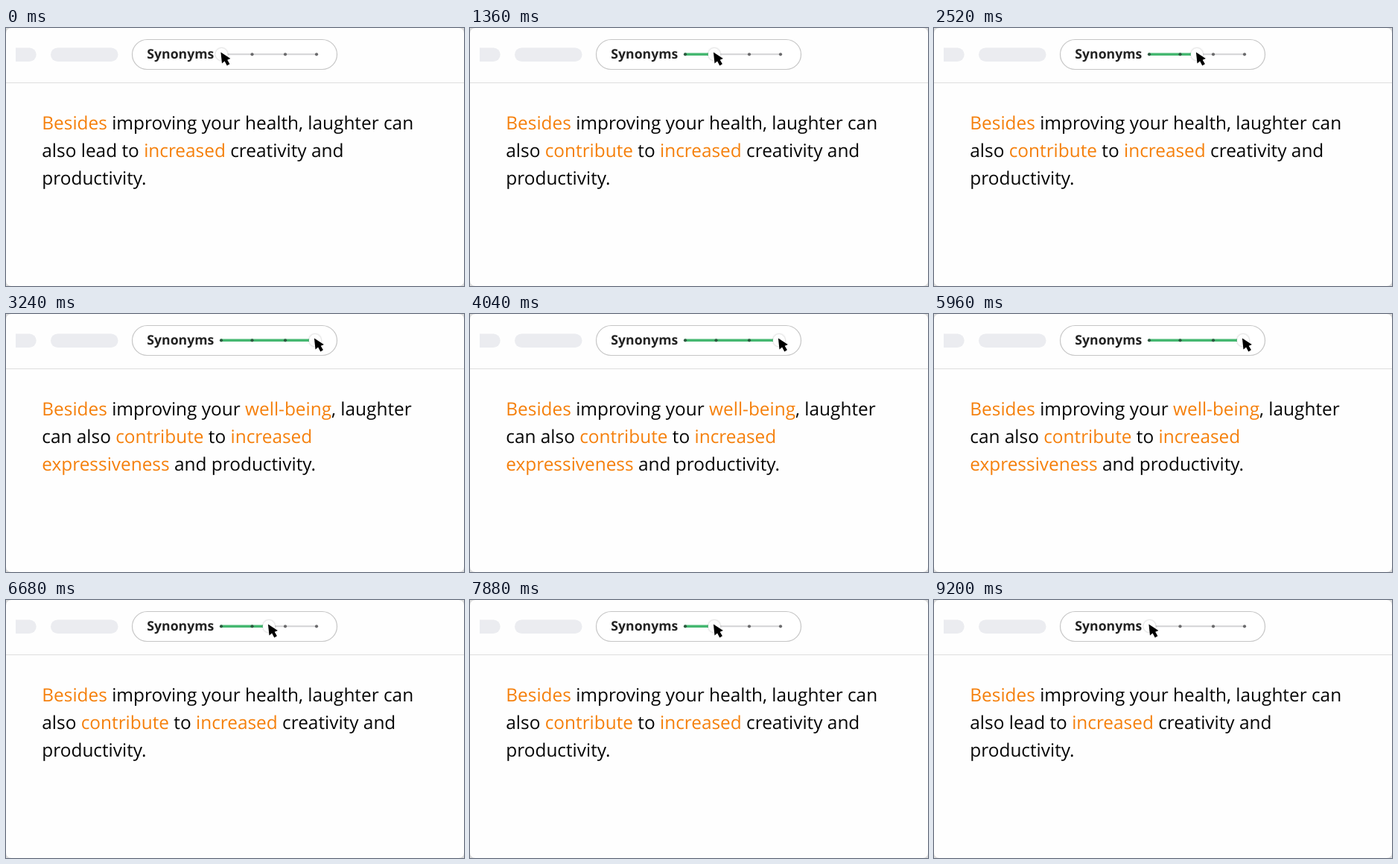
An HTML page for the animation above (9.24 s loop, 615 by 346 pixels).

```html
<!DOCTYPE html>
<html lang="en">
<head>
<meta charset="utf-8">
<title>Synonym slider</title>
<style>
  html, body { margin: 0; width: 100%; height: 100%; overflow: hidden; background: #dcdcdc; }
  svg { display: block; width: 100vw; height: 100vh; }
  text { font-family: "Open Sans", sans-serif; white-space: pre; text-rendering: geometricPrecision; }
  .body { font-size: 24.4px; fill: #050505; }
  .body .alt { fill: #f5800c; }
  .label { font-size: 17.65px; font-weight: 700; fill: #222; }
  #knob { filter: drop-shadow(0 .4px 1px rgba(0, 0, 0, .3)); }
</style>
</head>
<body>
<svg viewBox="0 0 615 346">
  <rect width="615" height="346" rx="7" fill="#fefefe"/>
  <path d="M13 26.5H31.5a9.2 9.2 0 0 1 0 18.4H13Z" fill="#ebecf0"/>
  <rect x="60" y="26.5" width="90.5" height="18.4" rx="9.2" fill="#ebecf0"/>
  <rect y="73" width="615" height="1" fill="#dedede"/>
  <rect x="169.5" y="15.5" width="275" height="40" rx="20" fill="#fff" stroke="#c6c6c6" stroke-width="1.2"/>
  <text class="label" x="189.3" y="40.8">Synonyms</text>
  <path d="M289 35.3H417" stroke="#d3d3d5" stroke-width="2"/>
  <path id="fill" stroke="#45b871" stroke-width="3.5"/>
  <g id="dots"></g>
  <circle id="knob" cy="35.3" r="8.2" fill="#fff"/>
  <path id="cursor" d="M0 0L1.6 15.2L5.2 12.2L8.4 18L12 15.8L8.8 10.4L13 8.6Z" fill="#000" stroke="#fff" stroke-width=".8" paint-order="stroke"/>
  <g id="copy"></g>
</svg>
<script>
const LOOP = 9240, STEP = 40, TURN = 4600, TRACK_Y = 35.3;
const $ = id => document.getElementById(id);

// Words in braces are the replaced ones
const texts = [
  ["{Besides} improving your health, laughter can", "also lead to {increased} creativity and", "productivity."],
  ["{Besides} improving your health, laughter can", "also {contribute} to {increased} creativity and", "productivity."],
  ["{Besides} improving your {well-being}, laughter", "can also {contribute} to {increased}", "{expressiveness} and productivity."]
];
const moves = [
  { start: 1080, end: 1320, from: 289.5, to: 328 },
  { start: 2391, end: 2840, from: 328, to: 415 }
];

const mark = line => line.replace(/{(.+?)}/g, '<tspan class="alt">$1</tspan>');
const layout = lines => lines
  .map((line, i) => `<text class="body" x="48.3" y="${135.5 + 37 * i}">${mark(line)}</text>`)
  .join("");

$("copy").innerHTML = texts.map(lines => `<g>${layout(lines)}</g>`).join("");
$("dots").innerHTML = [289, 330.5, 375, 417]
  .map(x => `<circle cx="${x}" cy="${TRACK_Y}" r="2.1"/>`).join("");
const dots = [...$("dots").children];
const copies = [...$("copy").children];

function knobAt(t) {
  let x = moves[0].from;
  for (const m of moves) {
    const p = Math.min(1, Math.max(0, (t - m.start) / (m.end - m.start)));
    x += (m.to - m.from) * p;
  }
  return x;
}

function draw(now) {
  const time = Math.floor((now % LOOP) / STEP) * STEP;
  const t = time > TURN ? 2 * TURN - time : time; // plays forward, then back
  const x = knobAt(t);
  const state = moves.filter(m => t >= m.end).length;
  $("knob").setAttribute("cx", x);
  $("cursor").setAttribute("transform", `translate(${x - 1.1} 32.4)`);
  $("fill").setAttribute("d", x > 290 ? `M288 ${TRACK_Y}H${x}` : "");
  dots.forEach(d => d.setAttribute("fill", +d.getAttribute("cx") < x ? "#2d5a40" : "#6a6a6c"));
  copies.forEach((g, i) => g.setAttribute("display", i === state ? "inline" : "none"));
}

const begin = performance.now();
function tick() {
  draw(performance.now() - begin);
  requestAnimationFrame(tick);
}
draw(0);
requestAnimationFrame(tick);
</script>
</body>
</html>
```
